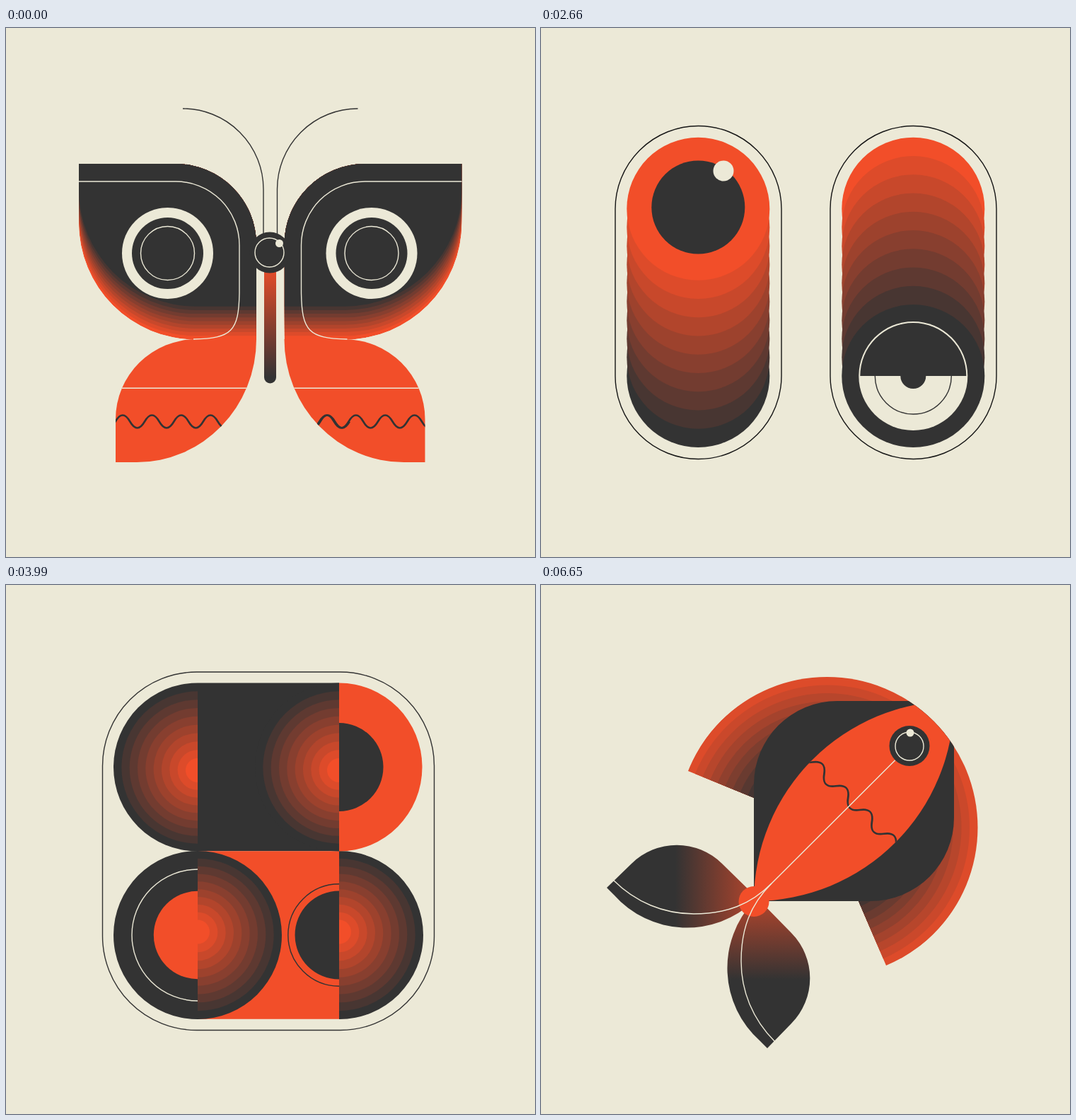
Write an HTML page without scripts that moves like this. It is 748 px wide and 748 px high and loops after 7980 ms.

```html
<!DOCTYPE html>
<html lang="en">
<head>
<meta charset="utf-8">
<title>Geometric shapes</title>
<style>
  html, body { margin: 0; height: 100%; overflow: hidden; background: #ece9d7; }
  svg {
    display: block; width: 100vw; height: 100vh;
    --x: 0px; --y: 0px; --r: 100px; --dr: 0px; --t: 9; --dt: -1;
  }

  /* One picture at a time, with hard cuts */
  .pic { visibility: hidden; animation: show 7.98s step-end calc(var(--n) * 1.33s) infinite; }
  @keyframes show {
    0% { visibility: visible; }
    16.666%, 100% { visibility: hidden; }
  }

  .ink { fill: #333; }
  .red { fill: #f24e29; }
  .rust { fill: #dd4b2a; }
  .pale { fill: #ece9d7; }
  .line { fill: none; stroke: #333; stroke-width: 1.4; }
  .thin { fill: none; stroke: #ece9d7; stroke-width: 1.4; }
  .wave { fill: none; stroke: #333; stroke-width: 2.6; }

  /* Blend: each step --i shifts, resizes and recolours (tone 0 = red, 9 = ink) */
  .blend > * {
    --k: calc(var(--t) + var(--i) * var(--dt));
    fill: rgb(calc(242 - 21.2 * var(--k)), calc(78 - 3 * var(--k)), calc(41 + 1.1 * var(--k)));
    transform: translate(calc(var(--i) * var(--x)), calc(var(--i) * var(--y)));
  }
  .blend > circle { r: calc(var(--r) + var(--i) * var(--dr)); }
</style>
</head>
<body>
<svg viewBox="0 0 748 748">
  <defs>
    <g id="discs" class="blend">
      <circle style="--i:0"/><circle style="--i:1"/><circle style="--i:2"/><circle style="--i:3"/><circle style="--i:4"/>
      <circle style="--i:5"/><circle style="--i:6"/><circle style="--i:7"/><circle style="--i:8"/><circle style="--i:9"/>
    </g>
    <path id="wave" d="M0 0q10.35-18 20.7 0t20.7 0 20.7 0 20.7 0 20.7 0 20.7 0 20.7 0 20.7 0 20.7 0 20.7 0 20.7 0 20.7 0 20.7 0 20.7 0 20.7 0 20.7 0 20.7 0 20.7 0"/>

    <linearGradient id="fade">
      <stop stop-color="#f24e29"/><stop offset="1" stop-color="#333"/>
    </linearGradient>
    <linearGradient id="stick" href="#fade" gradientUnits="userSpaceOnUse" x1="0" y1="330" x2="0" y2="494"/>
    <linearGradient id="flank" href="#fade" gradientUnits="userSpaceOnUse" x1="200" y1="400" x2="340" y2="260"/>
    <linearGradient id="finA" href="#fade" gradientUnits="userSpaceOnUse" x1="466" y1="196" x2="518" y2="248"/>
    <linearGradient id="finB" href="#fade" gradientUnits="userSpaceOnUse" x1="300" y1="556" x2="252" y2="508"/>
    <linearGradient id="tailFade" href="#fade" gradientUnits="userSpaceOnUse" x1="360" y1="0" x2="190" y2="0"/>

    <!-- butterfly -->
    <path id="wing" d="M103 192H240A114 114 0 0 1 354 306V440.500H268A165 165 0 0 1 103 275Z"/>
    <path id="low" d="M354 440A169 174 0 0 1 185 614H155V553A115 113 0 0 1 270 440Z"/>
    <clipPath id="wingClip"><use href="#wing"/></clipPath>
    <clipPath id="lowClip">
      <use href="#low"/><use href="#low" transform="matrix(-1 0 0 1 747.500 0)"/>
    </clipPath>
    <g id="half">
      <use href="#low" class="red"/>
      <g clip-path="url(#wingClip)">
        <g class="blend" style="--t:0;--dt:1;--y:-5.2px">
          <use href="#wing" style="--i:0"/><use href="#wing" style="--i:1"/><use href="#wing" style="--i:2"/>
          <use href="#wing" style="--i:3"/><use href="#wing" style="--i:4"/><use href="#wing" style="--i:5"/>
          <use href="#wing" style="--i:6"/><use href="#wing" style="--i:7"/><use href="#wing" style="--i:8"/>
          <use href="#wing" style="--i:9"/>
        </g>
      </g>
      <path class="thin" d="M103 217H240A90 90 0 0 1 330 307V375C329 428 320 439 265 440"/>
      <path class="line" d="M250 114A114 114 0 0 1 364 228V295"/>
    </g>
    <g id="spot">
      <circle class="pale" cx="228.500" cy="318.500" r="64.500"/>
      <circle class="ink" cx="228.500" cy="318.500" r="50.500"/>
      <circle class="thin" cx="228.500" cy="318.500" r="38"/>
    </g>

    <!-- angular fish -->
    <path id="belly" d="M251 251L146 356 386 595 404 576A102.500 102.500 0 0 0 427 427Z"/>
    <clipPath id="bellyClip"><use href="#belly"/></clipPath>

    <!-- half discs -->
    <clipPath id="leftHalf"><path d="M-120-120H0V120H-120Z"/></clipPath>
    <g id="dome" clip-path="url(#leftHalf)">
      <use href="#discs" style="--r:119px;--dr:-11.33px;--y:.5px"/>
    </g>

    <!-- round fish -->
    <clipPath id="fan"><path d="M404.500 343L208 263A213 213 0 1 1 488 538Z"/></clipPath>
    <clipPath id="round"><circle cx="404.500" cy="343" r="213"/></clipPath>
    <path id="lens" d="M301 447A283 283 0 0 1 584 164A283 283 0 0 1 301 447Z"/>
    <clipPath id="lensClip"><use href="#lens"/></clipPath>
    <path id="tail" fill="url(#tailFade)" d="M93 428L128 394A91 91 0 0 1 256 394L301 438V447A138 138 0 0 1 103 438Z"/>
    <path id="vein" class="thin" d="M102 417C134 449 174 465 216 465C262 465 296 452 326 422"/>
  </defs>

  <g class="pic" style="--n:0">
    <use href="#half"/>
    <use href="#half" transform="matrix(-1 0 0 1 747.500 0)"/>
    <use href="#spot"/>
    <use href="#spot" x="288.500"/>
    <g clip-path="url(#lowClip)">
      <path class="thin" d="M103 509.300H645"/>
      <use href="#wave" class="wave" x="113.200" y="556.500"/>
      <use href="#wave" class="wave" x="401.700" y="556.500"/>
    </g>
    <path fill="url(#stick)" d="M365 330H382V494A8.500 8.500 0 0 1 365 494Z"/>
    <circle class="ink" cx="373" cy="317.500" r="29"/>
    <circle class="thin" cx="372.500" cy="317.500" r="20.500"/>
    <circle class="pale" cx="386.500" cy="304.500" r="5.500"/>
  </g>

  <g class="pic" style="--n:1">
    <path fill="url(#finA)" d="M491 164L569 242A54 54 0 0 1 569 318L550 340 490 280 433 222Z"/>
    <path fill="url(#finB)" d="M223 432L164 490 243 569A54 54 0 0 0 319 569L340 551Z"/>
    <path class="ink" d="M425 425A105 105 0 0 0 564 417L595 386 550 340 490 280Z"/>
    <use href="#belly" class="rust"/>
    <path fill="#b2452c" d="M146 356L164 338 404 577 386 595Z"/>
    <path fill="url(#flank)" d="M356 146L530 320 373 477 366 369 314 418 308 311 256 361 251 251Z"/>
    <path class="red" d="M146 146H356L146 356Z"/>
    <path class="ink" d="M459 459L622 478 478 623Z"/>
    <g clip-path="url(#bellyClip)">
      <use href="#wave" class="wave" transform="translate(160 305) rotate(45) scale(1.008 1)"/>
    </g>
    <g class="thin">
      <circle cx="485" cy="217" r="10"/>
      <path d="M492 224L578 309"/>
      <circle cx="218" cy="486.500" r="10"/>
      <path d="M225 494L308 577"/>
      <circle cx="507" cy="389" r="13"/>
      <path d="M443 406A79 79 0 0 0 546 398L577 367"/>
    </g>
    <circle class="ink" cx="211" cy="210" r="30"/>
    <circle class="thin" cx="210.500" cy="210" r="20.500"/>
    <circle class="pale" cx="230" cy="211" r="5.500"/>
  </g>

  <g class="pic" style="--n:2">
    <g class="line" style="stroke:#151515">
      <rect x="105" y="138.500" width="235" height="471" rx="117.500"/>
      <rect x="409" y="138.500" width="235" height="471" rx="117.500"/>
    </g>
    <use href="#discs" x="222.300" y="492" style="--r:101px;--y:-26.25px"/>
    <circle class="ink" cx="222.300" cy="253.500" r="66"/>
    <circle class="pale" cx="258" cy="202" r="14.500"/>
    <use href="#discs" x="526.300" y="255.700" style="--r:101px;--y:26.25px;--t:0;--dt:1"/>
    <circle class="pale" cx="526.300" cy="492" r="77"/>
    <path class="ink" d="M451.300 492a75 75 0 0 1 150 0ZM508.300 492a18 18 0 0 0 36 0Z"/>
    <path class="line" d="M472.300 492a54 54 0 0 0 108 0"/>
  </g>

  <g class="pic" style="--n:3">
    <rect class="line" x="136.500" y="123" width="469" height="506.500" rx="133"/>
    <path class="ink" d="M271 138.500H471V376.300H271Z"/>
    <path class="red" d="M271 376.300H471V613.800H271Z"/>
    <use href="#dome" transform="translate(271 257.500)"/>
    <use href="#dome" transform="translate(471 257.500)"/>
    <use href="#dome" transform="translate(271 495) rotate(180)"/>
    <use href="#dome" transform="translate(471 495) rotate(180)"/>
    <path class="red" d="M471 138.500a117.500 119 0 0 1 0 238Z"/>
    <path class="ink" d="M471 195a62.500 62.500 0 0 1 0 125ZM271 376a119 119 0 0 0 0 238ZM471 432.500a62.500 62.500 0 0 0 0 125Z"/>
    <path class="red" d="M271 432.800a62.200 62.200 0 0 0 0 124.400Z"/>
    <path class="thin" d="M271 402a93 93 0 0 0 0 186"/>
    <path class="line" d="M471 422.800a72.200 72.200 0 0 0 0 144.400"/>
  </g>

  <g class="pic" style="--n:4">
    <path class="line" d="M498 126.500L615 243A128.500 128.500 0 0 1 433 424L328 317"/>
    <path class="line" d="M265 613L148 497A128.500 128.500 0 0 1 330 317L437 425"/>
    <use href="#discs" x="407.500" y="216.500" style="--r:112px;--x:12.95px;--y:12.95px"/>
    <use href="#discs" x="355.800" y="523.300" style="--r:112px;--x:-12.95px;--y:-12.9px"/>
    <path class="thin" d="M409 217.500L526 332M239 409L356 523.500"/>
  </g>

  <g class="pic" style="--n:5">
    <g clip-path="url(#fan)">
      <use href="#discs" x="404.500" y="343" style="--r:213px;--dr:-11.5px;--t:1;--dt:.9"/>
    </g>
    <use href="#tail"/>
    <use href="#tail" transform="matrix(0 -1 -1 0 748 748)"/>
    <g clip-path="url(#round)">
      <path class="ink" d="M301 447V282A118 118 0 0 1 419 164H584V329A118 118 0 0 1 466 447Z"/>
      <use href="#lens" class="red"/>
    </g>
    <circle class="red" cx="301" cy="447.500" r="21.500"/>
    <g clip-path="url(#lensClip)">
      <use href="#wave" class="wave" transform="translate(349.750 216.750) rotate(45) scale(1.153 .92)"/>
    </g>
    <use href="#vein"/>
    <use href="#vein" transform="matrix(0 -1 -1 0 748 748)"/>
    <path class="thin" d="M326 422L501 247.500"/>
    <circle class="ink" cx="521" cy="227.500" r="28.500"/>
    <circle class="thin" cx="521" cy="228" r="20"/>
    <circle class="pale" cx="522" cy="209" r="5.500"/>
  </g>
</svg>
</body>
</html>
```
